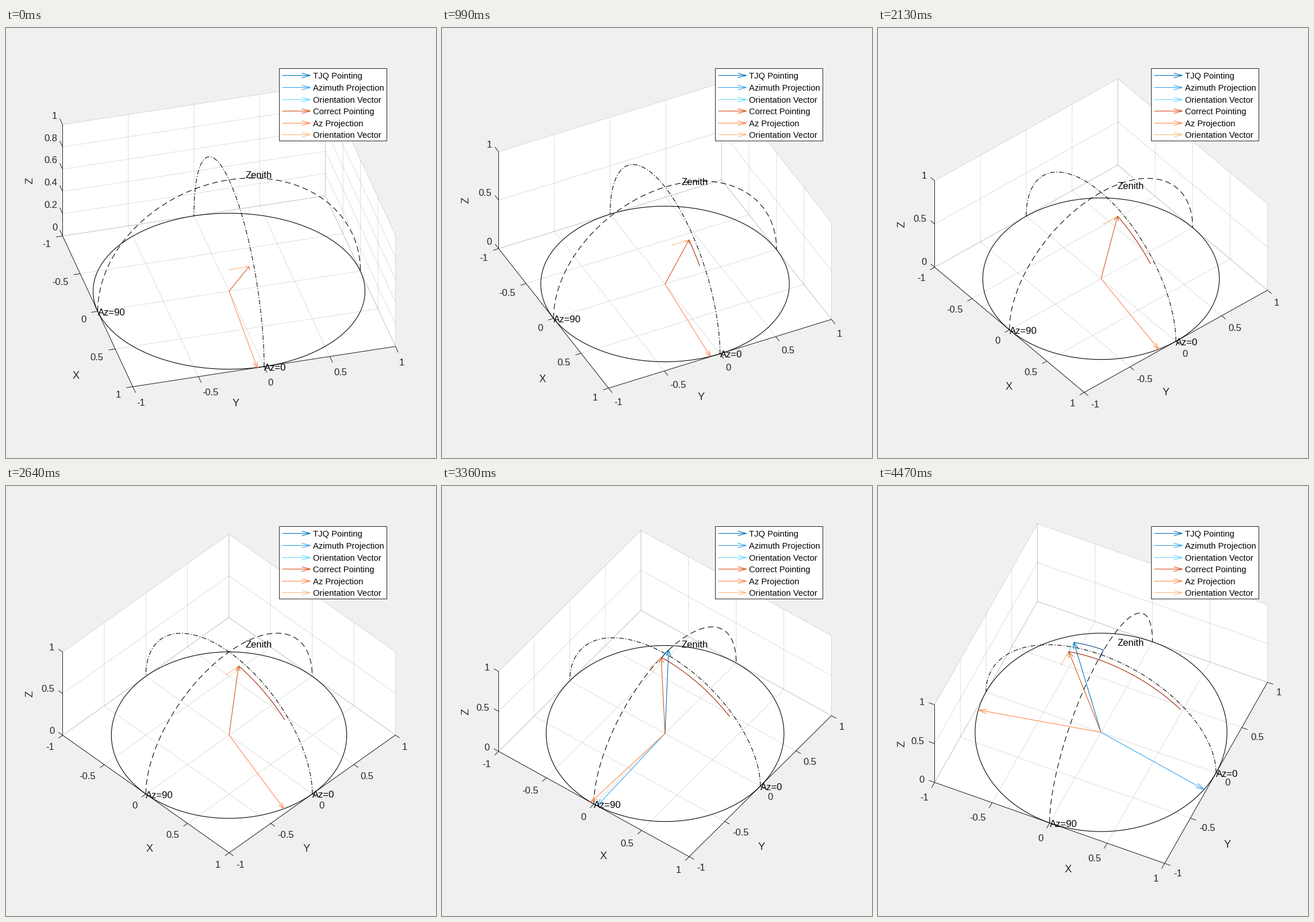
Write a matplotlib script that moves like this. It is 748 px wide and 748 px high and loops after 4.5 s.

```python
import numpy as np
import matplotlib.pyplot as plt
from matplotlib.animation import FuncAnimation
from matplotlib.collections import LineCollection

SIZE = 748
FRAMES, INTERVAL = 150, 30
PX = 0.72                      # points per pixel at 100 dpi
CENTER = np.array([387.5, 360.5])
HALF_WIDTH = 289.5
FLIP = 112                     # step at which the blue pointing goes over the top
TILT = np.radians(3)
TICKS = [-1, -0.5, 0, 0.5, 1]
INK = "#262626"

BLUES = [(0, .447, .741), (.2, .647, .941), (.4, .847, 1)]
REDS = [(.85, .325, .098), (1, .525, .298), (1, .725, .498)]
BLUE_TRAIL, RED_TRAIL = (0, .247, .541), (.65, .125, 0)

# axis label positions drift with the view
KEYS = [0, 33, 54, 88, 112, 130, 149]
X_LABEL = ([121, 174, 204, 249.5, 280.5, 304.5, 330.5],
           [602.5, 608.5, 615.5, 628.5, 641.5, 652.5, 664.5])
Y_LABEL = ([399.5, 450, 478.5, 522.5, 555, 579.5, 607.5],
           [650.5, 639.5, 634.5, 628.5, 625.5, 623.5, 621.5])

plt.rcParams["font.family"] = "Liberation Sans"
plt.rcParams["lines.scale_dashes"] = False
plt.rcParams["path.snap"] = False

fig = plt.figure(figsize=(7.48, 7.48), dpi=100, facecolor="#f0f0f0")


def full_axes(zorder):
    axes = fig.add_axes([0, 0, 1, 1], zorder=zorder)
    reset(axes)
    return axes


def reset(axes):
    axes.clear()
    axes.set_xlim(-0.5, SIZE - 0.5)
    axes.set_ylim(SIZE - 0.5, -0.5)
    axes.axis("off")


def line(axes, pts, color, width=1.0, **kw):
    pts = np.asarray(pts)
    axes.plot(pts[:, 0], pts[:, 1], color=color, lw=width * PX,
              solid_capstyle="butt", dash_capstyle="butt", **kw)


def text(axes, x, y, s, px=16.67, color=INK, ha="left"):
    """Place text so that its capitals are centred on y."""
    axes.text(x, y + 0.36 * px, s, fontsize=px * PX, color=color,
              ha=ha, va="baseline")


def arrow(axes, tail, tip, color, back, half):
    tail, tip = np.asarray(tail, float), np.asarray(tip, float)
    d = tip - tail
    d /= np.hypot(*d)
    side = np.array([-d[1], d[0]]) * half
    base = tip - d * back
    line(axes, [tail, tip], color, 1.1)
    line(axes, [base + side, tip, base - side], color, 1.1)


class View:
    """Orthographic camera scaled so the box always fills the same width."""

    def __init__(self, i):
        az = np.radians(75.05 - 0.342 * i)
        el = np.radians(35 + 0.1137 * i)
        self.scale = HALF_WIDTH / (np.cos(az) + np.sin(az))
        right = [np.cos(az), np.sin(az), 0]
        up = [-np.sin(az) * np.sin(el), np.cos(az) * np.sin(el), np.cos(el)]
        self.basis = self.scale * np.array([right, np.negative(up)]).T

    def __call__(self, pts):
        return CENTER + (np.asarray(pts, float) - [0, 0, 0.5]) @ self.basis

    def direction(self, vec):
        d = np.asarray(vec, float) @ self.basis
        return d / np.hypot(*d)


def pointing(i, side=-1):
    """Great-circle pass leaning slightly off the zenith."""
    t = np.radians(45 - 60 * np.asarray(i) / (FRAMES - 1))
    return np.stack([np.sin(t), side * np.sin(TILT) * np.cos(t),
                     np.cos(TILT) * np.cos(t)], axis=-1)


def draw_box(view, z_ticks):
    outline = [(-1, -1, 0), (1, -1, 0), (1, 1, 0),
               (1, 1, 1), (-1, 1, 1), (-1, -1, 1)]
    ax.fill(*view(outline).T, color="white", lw=0)
    grid = []
    for t in TICKS:
        grid += [[(t, -1, 0), (t, 1, 0)], [(-1, t, 0), (1, t, 0)],
                 [(-1, t, 0), (-1, t, 1)], [(t, 1, 0), (t, 1, 1)]]
    for z in z_ticks:
        grid += [[(-1, -1, z), (-1, 1, z)], [(-1, 1, z), (1, 1, z)]]
    ax.add_collection(LineCollection([view(g) for g in grid], lw=PX,
                                     colors=[(.15, .15, .15, .15)]))
    line(ax, view([(-1, -1, 1), (-1, -1, 0), (1, -1, 0), (1, 1, 0)]), INK)


def draw_ticks(view, values, place, outward, shift, ha):
    lengths = np.hypot(*view.basis.T) * [2, 2, 1]
    size = 0.025 * lengths.max()
    d = view.direction(outward)
    for v in values:
        p = view(place(v))
        line(ax, [p, p + size * d], INK)
        x, y = p + (size + 6.6) * d + shift
        text(ax, x, y, f"{v:g}", ha=ha)


def draw_axes(view, i):
    z_ticks = [0, .2, .4, .6, .8, 1] if i < 16 else [0, .5, 1]
    draw_box(view, z_ticks)
    draw_ticks(view, TICKS, lambda v: (v, -1, 0), (0, -1, 0), (-2.2, 10.5), "right")
    draw_ticks(view, TICKS, lambda v: (1, v, 0), (1, 0, 0), (-1, 10.5), "left")
    draw_ticks(view, z_ticks, lambda v: (-1, -1, v), (-1, 0, 0), (-1.6, 0.2), "right")
    for name, (xs, ys) in (("X", X_LABEL), ("Y", Y_LABEL)):
        text(ax, np.interp(i, KEYS, xs), np.interp(i, KEYS, ys), name,
             px=18.3, ha="center")
    ax.text(41, view((-1, -1, 0.5))[1], "Z", fontsize=18.3 * PX, color=INK,
            rotation=90, ha="center", va="center")


def draw_sky(view):
    a = np.linspace(0, 2 * np.pi, 181)
    h = np.linspace(0, np.pi, 121)
    zero = np.zeros_like(h)
    line(ax, view(np.stack([np.cos(a), np.sin(a), 0 * a], 1)), "black", 1.1)
    line(ax, view(np.stack([np.cos(h), zero, np.sin(h)], 1)), "black", 1.1,
         ls=(0, (8 * PX, 3 * PX, 1.5 * PX, 3 * PX)))
    line(ax, view(np.stack([zero, -np.cos(h), np.sin(h)], 1)), "black", 1.1,
         ls=(0, (10 * PX, 6 * PX)))


def draw_vectors(view, tip, azimuth, trail, colors, trail_color):
    def vector(start, end, color):
        a, b = view(start), view(end)
        norm = np.linalg.norm(np.subtract(end, start))
        arrow(ax, a, b, color, 0.07 * np.hypot(*(b - a)),
              0.018 * view.scale * norm)

    vector((0, 0, 0), tip, colors[0])
    vector((0, 0, 0), azimuth, colors[1])
    vector(tip, tip + [0, -0.15, 0], colors[2])
    if len(trail) > 1:
        line(ax, view(trail), trail_color, 1.1)


def heading(p, sign=1):
    return sign * np.array([p[0], p[1], 0]) / np.hypot(p[0], p[1])


def draw(i):
    reset(ax)
    view = View(i)
    draw_axes(view, i)
    draw_sky(view)
    if i >= FLIP:
        tip = pointing(i, 1)
        trail = np.vstack([pointing(FLIP - 1),
                           pointing(np.arange(FLIP, i + 1), 1)])
        draw_vectors(view, tip, heading(tip, -1), trail, BLUES, BLUE_TRAIL)
    tip = pointing(i)
    draw_vectors(view, tip, heading(tip), pointing(np.arange(i + 1)),
                 REDS, RED_TRAIL)
    for s, p in (("Az=0", (1, 0, 0)), ("Az=90", (0, -1, 0)),
                 ("Zenith", (.1, .1, 1.1))):
        x, y = view(p)
        text(ax, x, y + 0.8, s, color="black")
    return []


def draw_legend(axes):
    axes.fill([475, 662, 662, 475], [70, 70, 196, 196], facecolor="white",
              edgecolor=INK, lw=PX)
    names = ["TJQ Pointing", "Azimuth Projection", "Orientation Vector",
             "Correct Pointing", "Az Projection", "Orientation Vector"]
    for k, (name, color) in enumerate(zip(names, BLUES + REDS)):
        y = round(82.4 + 20.6 * k)
        arrow(axes, (480, y), (529, y), color, 15, 4)
        text(axes, 533.5, y + 0.4, name, px=14.8, color="black")


ax = full_axes(1)
draw_legend(full_axes(2))
anim = FuncAnimation(fig, draw, frames=FRAMES, init_func=lambda: [],
                     interval=INTERVAL, repeat=True, repeat_delay=0)
plt.show()
```
